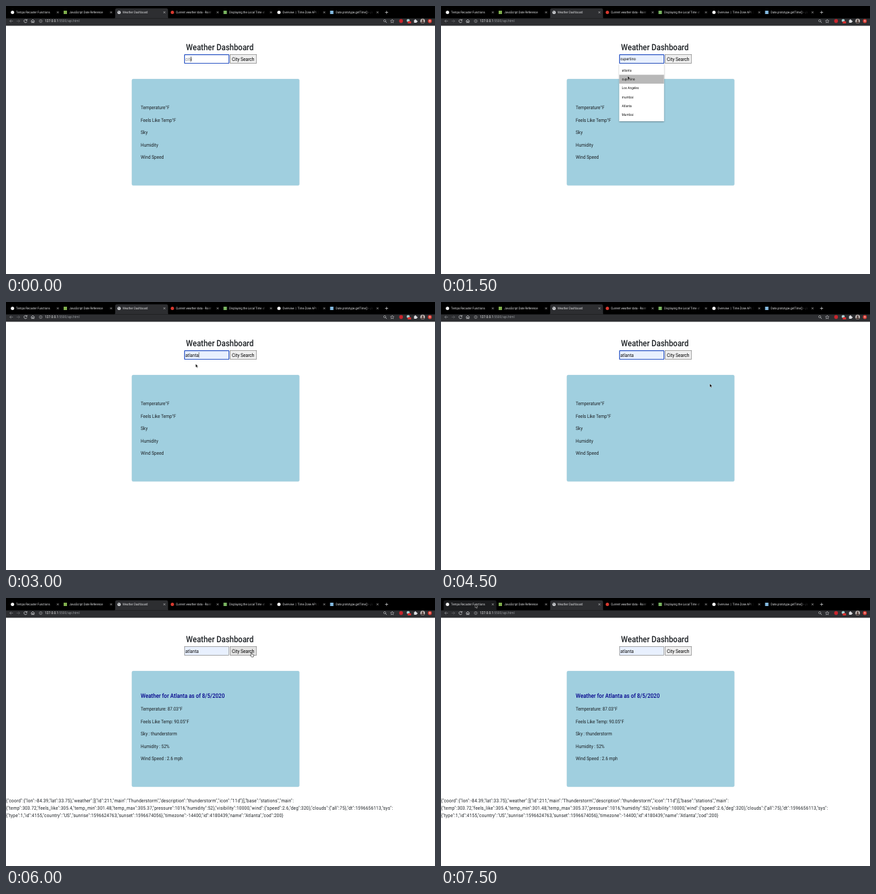
These frames come from a looping animation (640 by 400 pixels, 8 s). An HTML page:

```html
<!DOCTYPE html>
<html lang="en">
<head>
<meta charset="utf-8">
<title>Weather Dashboard</title>
<style>
  html, body { margin: 0; width: 100%; height: 100%; overflow: hidden; background: #fff; }
  svg { display: block; width: 100%; height: 100%; }
  text { font-family: Roboto, Inter, sans-serif; text-rendering: geometricPrecision; white-space: pre; }
</style>
</head>
<body>
<svg id="stage" viewBox="0 0 640 400">
  <defs>
    <linearGradient id="fade"><stop stop-color="#000" stop-opacity="0"/><stop offset="1" stop-color="#000"/></linearGradient>
    <filter id="shadow" x="-10%" y="-10%" width="120%" height="120%">
      <feDropShadow dx="0" dy=".8" stdDeviation=".8" flood-opacity=".4"/>
    </filter>
  </defs>
  <g id="browser"></g>
  <g id="page"></g>
</svg>
<script>
const LOOP = 8000, STEP = 1500;
const TOOLBAR = '#2d2e31', INK = '#1c2024', PALE = '#dcdde0';
const CONDENSED = 0.88;   // the whole interface uses one narrow face

const rect = (x, y, w, h, fill, extra = '') =>
  `<rect x="${x}" y="${y}" width="${w}" height="${h}" fill="${fill}" ${extra}/>`;
const circle = (x, y, r, fill, extra = '') =>
  `<circle cx="${x}" cy="${y}" r="${r}" fill="${fill}" ${extra}/>`;
const line = (d, stroke = PALE, width = .7) =>
  `<path d="${d}" fill="none" stroke="${stroke}" stroke-width="${width}"/>`;
const text = (x, y, size, str, fill = INK, extra = '') =>
  `<text transform="translate(${x} ${y}) scale(${CONDENSED} 1)" font-size="${size}" fill="${fill}" ${extra}>${str}</text>`;

const tabs = [
  ['Tempo Recaster Functions', 'circle', '#f4f4f4'],
  ['JavaScript Date Reference', 'square', '#7fae4c'],
  ['Weather Dashboard', 'globe', '#d5d7da'],
  ['Current weather data - Raint', 'circle', '#d8392f'],
  ['Displaying the Local Time of a', 'square', '#79b560'],
  ['Overview  |  Time Zone API  |', 'circle', '#f4f4f4'],
  ['Date.prototype.getTime() - Ja', 'square', '#83b9e0'],
];

function drawTab([title, icon, color], i, hovered) {
  const x = 3.3 + 79.5 * i, active = i === 2;
  const shape = 'M' + (x - 1) + ' 18.6q1.6 0 1.6-2V6q0-2.4 2.4-2.4h74q2.4 0 2.4 2.4v10.6q0 2 1.6 2z';
  const back = active ? TOOLBAR : hovered ? '#1b1c1e' : '#000';
  const fav = icon === 'square' ? rect(x + 3.2, 7, 5, 5, color) : circle(x + 6.4, 9.5, 2.5, color);
  const land = icon === 'globe' ? line(`M${x + 4.6} 8.4l1.8 .5.4 1.6M${x + 7} 7.4l1 1.3`, '#55585c', .7) : '';
  const fade = i > 2 ? rect(x + 58, 5, 8, 9, 'url(#fade)') + rect(x + 66, 5, 6, 9, '#000') : '';
  return `<path d="${shape}" fill="${back}"/>` + fav + land +
    text(x + 11.8, 11.3, 4.85, title, '#e4e5e7') + fade +
    line(`M${x + 72.6} 8.1l2.8 2.8m0-2.8l-2.8 2.8`, '#d0d0d0', .6);
}

function drawBrowser(hoverFirst) {
  const tabStrip = rect(0, 0, 640, 19, '#000') +
    tabs.map((tab, i) => drawTab(tab, i, hoverFirst && i === 0)).join('') +
    line('M565.5 9.5h4.6M567.8 7.2v4.6');
  const navigation =
    line('M10.4 22.5H5.6m2.2-2.2l-2.2 2.2 2.2 2.2', '#8d8e91') +
    line('M15.8 22.5h4.8m-2.2-2.2l2.2 2.2-2.2 2.2', '#66686b') +
    line('M31 21.2a2.3 2.3 0 1 0 .3 1.9M31.3 19.7v1.8h-1.8') +
    line('M37.2 22.7l2.8-2.6 2.8 2.6M38.1 22.2v2.6h1.3v-1.7h1.2v1.7h1.3v-2.6') +
    circle(51.8, 22.5, 2.1, 'none', 'stroke="#c8c9cb" stroke-width=".5"') +
    line('M51.8 22.2v1.4M51.8 21.2v.5', '#c8c9cb', .5);
  const address = text(58, 24.4, 5.5,
    '127.0.0.1<tspan fill="#95989c">:5500/api.html</tspan>', '#f1f1f1');
  const tools =
    circle(565, 22, 1.6, 'none', 'stroke="#c8c9cb" stroke-width=".6"') + line('M566.2 23.2l1.9 1.9') +
    line('M576.2 19.9l.8 1.8 1.9.2-1.4 1.3.4 1.9-1.7-1-1.7 1 .4-1.9-1.4-1.3 1.9-.2z', PALE, .5) +
    circle(589.4, 22.4, 2.8, '#c8242c') +
    circle(600, 21.7, 2.3, '#a9d2d4') + rect(599.3, 22.8, 5, 3.2, '#d8302f', 'rx=".6"') +
    rect(608.7, 21, 4, 4, PALE, 'rx=".5"') + circle(610.7, 20.7, 1, PALE) + circle(613, 23, 1, PALE) +
    circle(621.6, 22.5, 3.4, '#c9c1bd') + circle(621.6, 21.4, 1.3, '#4b3834') +
    '<path d="M619.1 24.8q.5-2 2.5-2t2.5 2q-2.5 2-5 0" fill="#4b3834"/>' +
    circle(632.3, 22.5, 2.9, '#d93a32') + line('M632.3 24v-2.8m-1.2 1.2l1.2-1.2 1.2 1.2', '#fff', .6);
  return tabStrip + rect(0, 18.5, 640, 11, TOOLBAR) + navigation + address + tools;
}

const pointers = {
  arrow: '<path d="M0 0v5.2l1.2-1.1.9 2 .9-.4-.9-1.9h1.7z" fill="#000" stroke="#fff" stroke-width=".4"/>',
  hand: '<path d="M-.9-2.3q.8-.7 1.1.2l.3 2 2 .5q.9.3.7 1.2l-.6 2.4H-.3L-2.1 1.6q-.1-.9 1.4-.1z" fill="#fff" stroke="#000" stroke-width=".55"/>',
  beam: line('M-1.2-3.1q1.2 0 1.2.8v4.6q0 .8-1.2.8M1.2-3.1q-1.2 0-1.2.8v4.6q0 .8 1.2.8M-.7.8h1.4', '#333', .5),
};

const scenes = [
  { pointer: ['beam', 276, 79], value: 'city', hint: true, focus: true },
  { pointer: ['arrow', 278.6, 104.6], value: 'cupertino', preview: true, focus: true, menu: true },
  { pointer: ['arrow', 282.9, 92.4], value: 'atlanta', focus: true, caret: 287.9 },
  { pointer: ['arrow', 401, 122], value: 'atlanta', focus: true },
  { pointer: ['hand', 366.5, 84], value: 'atlanta', pressed: true, loaded: true },
  { pointer: ['arrow', 51, 9.3], value: 'atlanta', loaded: true, tabHover: true },
];

const emptyReport = ['Temperature°F', 'Feels Like Temp°F', 'Sky', 'Humidity', 'Wind Speed'];
const report = ['Temperature: 87.03°F', 'Feels Like Temp: 90.05°F', 'Sky : thunderstorm', 'Humidity : 52%', 'Wind Speed : 2.6 mph'];
const response = [
  '{"coord":{"lon":-84.39,"lat":33.75},"weather":[{"id":211,"main":"Thunderstorm","description":"thunderstorm","icon":"11d"}],"base":"stations","main":',
  '{"temp":303.72,"feels_like":305.4,"temp_min":301.48,"temp_max":305.37,"pressure":1016,"humidity":52},"visibility":10000,"wind":{"speed":2.6,"deg":320},"clouds":{"all":75},"dt":1596656113,"sys":',
  '{"type":1,"id":4155,"country":"US","sunrise":1596624763,"sunset":1596674056},"timezone":-14400,"id":4180439,"name":"Atlanta","cod":200}',
];
const suggestions = ['atlanta', 'cupertino', 'Los Angeles', 'mumbai', 'Atlanta', 'Mumbai'];

function drawForm({ value, hint, preview, focus, caret, pressed }) {
  const border = focus ? 'stroke="#2c56c4" stroke-width="1.2" rx=".6"' : 'stroke="#858585" stroke-width=".7"';
  return text(268.6, 65.6, 13, 'Weather Dashboard', INK, 'font-weight="500"') +
    rect(266.4, 72.6, 66.2, 12.9, hint ? '#fff' : '#e8f0fe', border) +
    text(267.5, preview ? 81.2 : 81.6, preview ? 6.2 : 7.4, value, hint ? '#858585' : '#111') +
    (caret ? line(`M${caret} 75v7.8`, '#111', .5) : '') +
    rect(334.4, 72.6, 39.3, 12.9, pressed ? '#e2e2e2' : '#efefef', 'stroke="#808080" stroke-width=".7"') +
    text(337, 81.6, 7.6, 'City Search', '#000');
}

function drawCard(loaded) {
  const first = loaded ? 168.1 : 154.1;
  return rect(187.8, 109, 249.8, loaded ? 172.7 : 158.8, '#a0cfdf', 'rx="2" stroke="#93bfce" stroke-width=".3"') +
    (loaded ? text(201, 149.2, 9.1, 'Weather for Atlanta as of 8/5/2020', '#00008b', 'font-weight="500"') : '') +
    (loaded ? report : emptyReport).map((row, i) => text(201, first + 18.5 * i, 7.4, row)).join('');
}

const drawResponse = () => response.map((row, i) =>
  text(0, 304.9 + 11.1 * i, 7.4, row, INK, 'letter-spacing=".23"')).join('');

const drawMenu = () => rect(265.9, 86.2, 66.8, 85.8, '#fff', 'filter="url(#shadow)"') +
  rect(265.9, 102.6, 66.8, 13.3, '#b8b8b8') +
  suggestions.map((city, i) => text(269.8, 97.8 + 13.3 * i, 5.3, city, '#111')).join('');

function drawPage(scene) {
  const [kind, x, y] = scene.pointer;
  return drawForm(scene) + drawCard(scene.loaded) +
    (scene.loaded ? drawResponse() : '') + (scene.menu ? drawMenu() : '') +
    `<g transform="translate(${x} ${y})">${pointers[kind]}</g>`;
}

const browser = document.getElementById('browser'), page = document.getElementById('page');
let shown = null;

function render(now) {
  const scene = scenes[Math.floor(now % LOOP / STEP)];
  if (scene !== shown) {
    browser.innerHTML = drawBrowser(scene.tabHover);
    page.innerHTML = drawPage(scene);
    shown = scene;
  }
}

const start = performance.now();
function tick() {
  render(performance.now() - start);
  requestAnimationFrame(tick);
}
tick();
</script>
</body>
</html>
```
